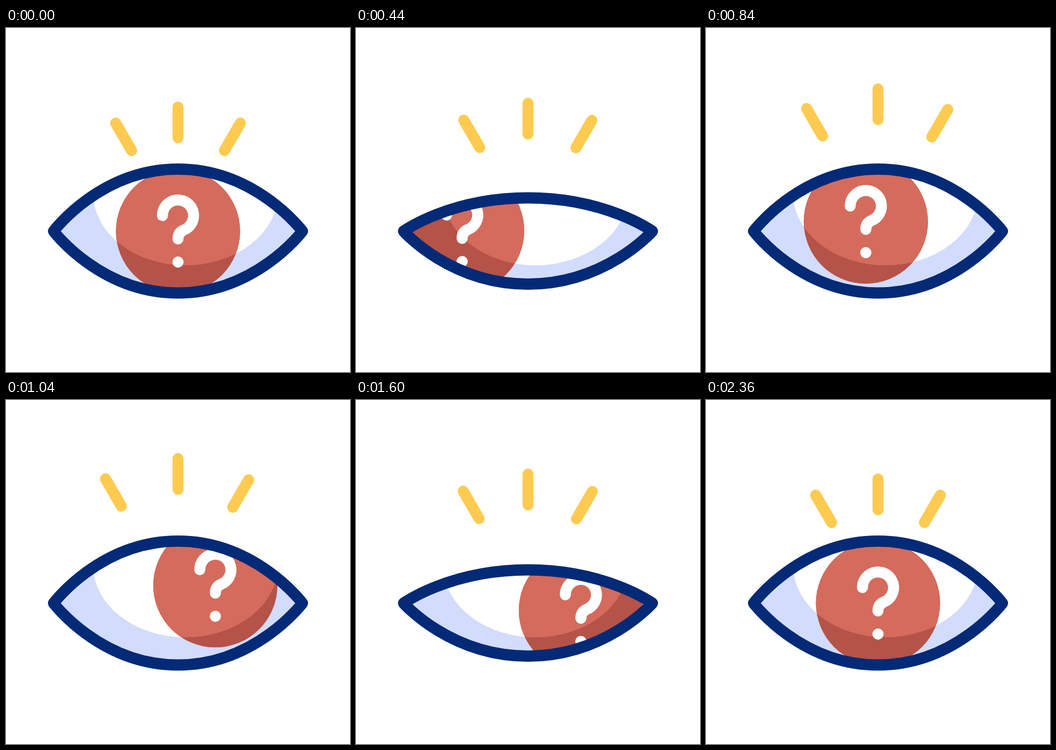
Recreate the animation shown at these times as an HTML page with a canvas. Size 640 by 640 pixels, loop 2400 ms.

```html
<!DOCTYPE html>
<html lang="en">
<head>
<meta charset="utf-8">
<title>Looking eye</title>
<style>
  html, body { margin: 0; width: 100%; height: 100%; overflow: hidden; background: #fff; }
  canvas { display: block; width: 100vmin; height: 100vmin; }
</style>
</head>
<body>
<canvas id="stage" width="640" height="640"></canvas>
<script>
const ctx = document.getElementById('stage').getContext('2d');
const LOOP = 2400, STEP = 40;
const NAVY = '#032a76', YELLOW = '#fecb50', LILAC = '#d2dcfd';
const RED = '#d56b5c', DARK_RED = '#b55348', WHITE = '#fff';

// Each key is [time, value, ...]
const IRIS = [[80, 320, 378], [440, 197.5, 377], [1360, 454.3, 334],
              [1630, 417.5, 393], [2000, 417.5, 393], [2360, 320, 378]];
const SQUINT = [[240, 0], [440, 1], [680, 1], [840, 0],
                [1160, 0], [1360, 1], [1600, 1], [1760, 0]];
const RAYS = [[190, 0], [1035, 1], [1060, 1], [1880, 0]];

// Ease-in-out, cubic-bezier(.42, 0, .58, 1)
function ease(x) {
  let lo = 0, hi = 1;
  for (let i = 0; i < 24; i++) {
    const s = (lo + hi) / 2, r = 1 - s;
    if (1.26 * s * r * r + 1.74 * s * s * r + s * s * s < x) lo = s;
    else hi = s;
  }
  return lo * lo * (3 - 2 * lo);
}

const mix = (a, b, p) => a + (b - a) * p;

function sample(keys, t) {
  if (t <= keys[0][0]) return keys[0].slice(1);
  for (let i = 1; i < keys.length; i++) {
    const a = keys[i - 1], b = keys[i];
    if (t < b[0]) {
      const p = ease((t - a[0]) / (b[0] - a[0]));
      return a.slice(1).map((v, k) => mix(v, b[k + 1], p));
    }
  }
  return keys[keys.length - 1].slice(1);
}

function lensPath(squint) {
  const left = 88.5, right = 551.5, mid = 378, reach = 145;
  const top = mix(262.5, 316, squint), bottom = mix(493, 476.5, squint);
  const path = new Path2D();
  path.moveTo(left, mid);
  path.bezierCurveTo(left, mid, 320 - reach, top, 320, top);
  path.bezierCurveTo(320 + reach, top, right, mid, right, mid);
  path.bezierCurveTo(right, mid, 320 + reach, bottom, 320, bottom);
  path.bezierCurveTo(320 - reach, bottom, left, mid, left, mid);
  path.closePath();
  return path;
}

function ellipsePath(x, y, rx, ry = rx) {
  const path = new Path2D();
  path.ellipse(x, y, rx, ry, 0, 0, Math.PI * 2);
  return path;
}

function fill(path, color) {
  ctx.fillStyle = color;
  ctx.fill(path);
}

function stroke(path, color, width) {
  ctx.strokeStyle = color;
  ctx.lineWidth = width;
  ctx.stroke(path);
}

const lit = ellipsePath(334, 307.5, 172, 134);
const hook = new Path2D('M-29-29A29 29 0 1 1 10.5-2C4 .8 0 6 0 14.5');
const dot = ellipsePath(0, 57.5, 10.4);

function drawIris(x, y) {
  const disc = ellipsePath(x, y, 115.5);
  fill(disc, DARK_RED);
  ctx.save();
  ctx.clip(lit);
  fill(disc, RED);
  ctx.restore();
  ctx.save();
  ctx.translate(x, y);
  stroke(hook, WHITE, 20.5);
  fill(dot, WHITE);
  ctx.restore();
}

function drawRay(x1, y1, x2, y2, dx, dy) {
  const path = new Path2D();
  path.moveTo(x1 + dx, y1 + dy);
  path.lineTo(x2 + dx, y2 + dy);
  stroke(path, YELLOW, 20.5);
}

function draw(t) {
  const [squint] = sample(SQUINT, t);
  const [x, y] = sample(IRIS, t);
  const [out] = sample(RAYS, t);
  const lens = lensPath(squint);

  fill(ellipsePath(320, 320, 640), WHITE);
  ctx.lineCap = ctx.lineJoin = 'round';

  drawRay(204, 177, 233.7, 228, -19 * out, -30.5 * out);
  drawRay(320, 147, 320, 204.3, 0, -38 * out);
  drawRay(436, 177, 406.3, 228, 15.5 * out, -28.5 * out);

  ctx.save();
  ctx.clip(lens);
  fill(lens, LILAC);
  fill(lit, WHITE);
  drawIris(x, y);
  ctx.restore();
  stroke(lens, NAVY, 21);
}

function tick() {
  const t = performance.now() % LOOP;
  draw(Math.floor(t / STEP) * STEP);
  requestAnimationFrame(tick);
}
tick();
</script>
</body>
</html>
```
